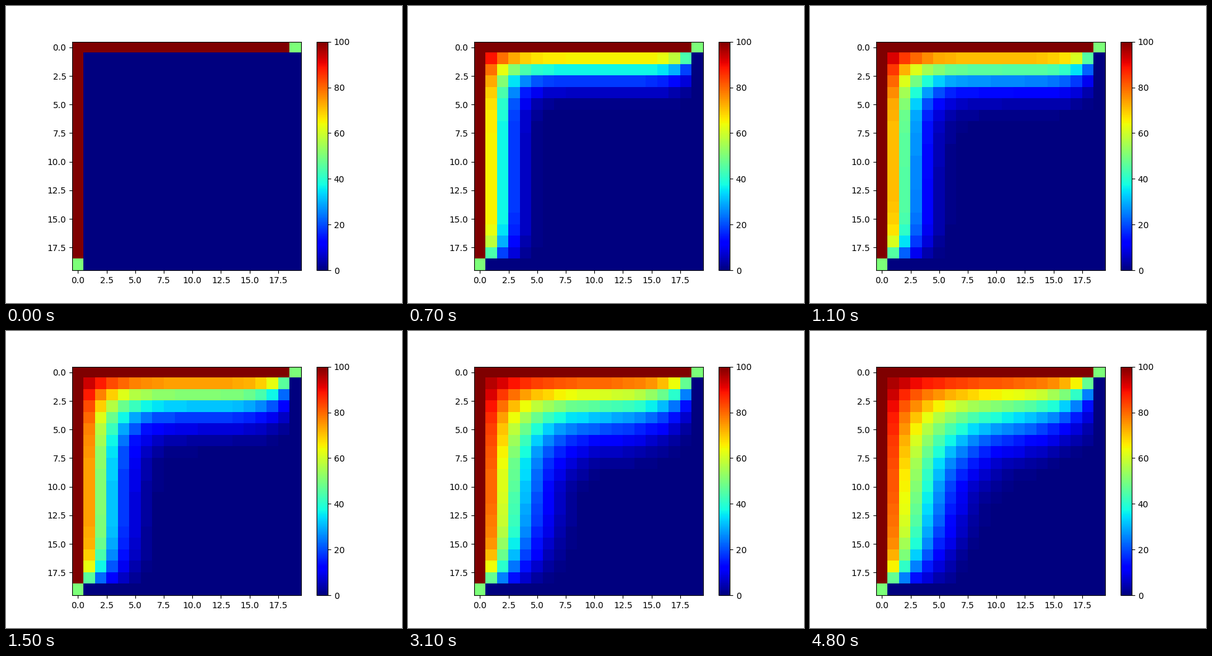
Write a matplotlib script that moves like this. It is 640 px wide and 480 px high and loops after 5 s.

```python
import numpy as np
import matplotlib.pyplot as plt
from matplotlib.animation import FuncAnimation

SIZE = 20
FRAMES = 50
INTERVAL = 100
LAST_STEP = 72


def start_plate():
    """Hot top and left edges, cold right and bottom edges."""
    plate = np.zeros((SIZE, SIZE), dtype=int)
    plate[0, :] = plate[:, 0] = 100
    plate[0, -1] = plate[-1, 0] = 50
    return plate


def relax(plate):
    """Replace each inner cell by the whole-degree mean of its neighbours."""
    new = plate.copy()
    new[1:-1, 1:-1] = (plate[:-2, 1:-1] + plate[2:, 1:-1]
                       + plate[1:-1, :-2] + plate[1:-1, 2:]) // 4
    return new


states = [start_plate()]
for _ in range(LAST_STEP):
    states.append(relax(states[-1]))

fig, ax = plt.subplots(figsize=(6.4, 4.8), dpi=100)
image = ax.imshow(states[0], cmap="jet", vmin=0, vmax=100)
fig.colorbar(image, ax=ax)


def update(frame):
    # three relaxation steps for every two frames
    step = min((3 * frame + 1) // 2, LAST_STEP)
    image.set_data(states[step])
    return [image]


anim = FuncAnimation(fig, update, frames=FRAMES, interval=INTERVAL,
                     repeat=True, repeat_delay=0)
plt.show()
```
